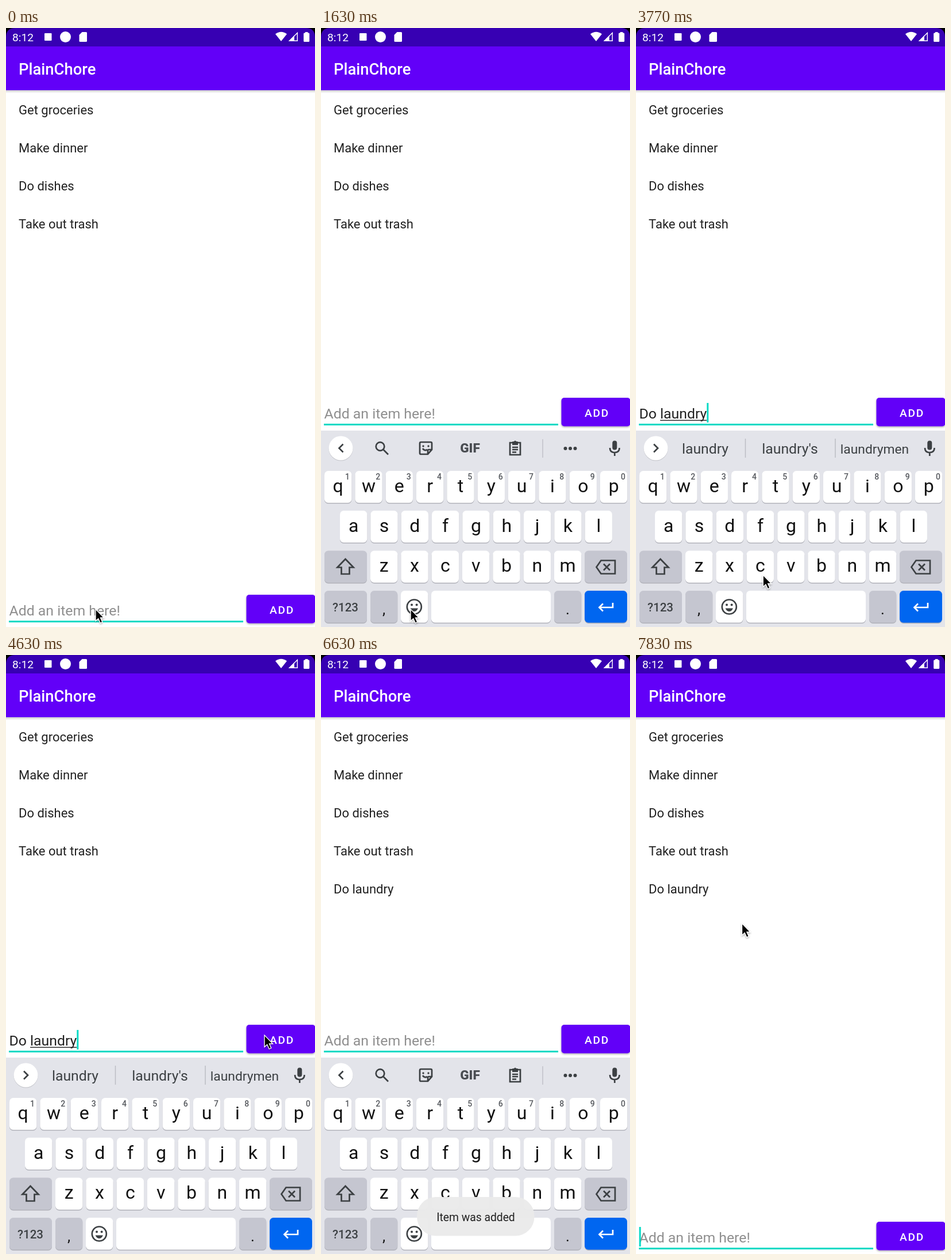
Animation, 538 px wide and 1040 px high, one loop 8000 ms. Source, as an HTML page:

```html
<!DOCTYPE html>
<html lang="en">
<head>
<meta charset="utf-8">
<title>PlainChore</title>
<style>
  html, body { margin: 0; width: 100%; height: 100%; overflow: hidden; background: #fff; }
  svg { display: block; width: 100%; height: 100%; }
  text { font-family: Roboto, "Noto Sans", sans-serif; white-space: pre; }
  .mid { text-anchor: middle; }
  .line { fill: none; stroke: #3c4043; stroke-width: 2.7; }
</style>
</head>
<body>
<svg viewBox="0 0 538 1040" xmlns="http://www.w3.org/2000/svg">
  <defs>
    <linearGradient id="shade" x2="0" y2="1">
      <stop stop-color="#000" stop-opacity=".2"/>
      <stop offset="1" stop-color="#000" stop-opacity="0"/>
    </linearGradient>
    <filter id="soft" x="-20%" y="-30%" width="140%" height="180%">
      <feDropShadow dx="0" dy="1.5" stdDeviation="1.5" flood-opacity=".35"/>
    </filter>
    <clipPath id="btnClip"><rect x="418.5" y="984" width="120" height="49.5" rx="5"/></clipPath>
  </defs>
  <rect width="538" height="1040" fill="#fff"/>

  <rect y="108" width="538" height="5" fill="url(#shade)"/>
  <rect y="31" width="538" height="77" fill="#6200f8"/>
  <rect width="538" height="32" fill="#000"/>
  <path d="M0 32V16Q0 0 16 0H522Q538 0 538 16V32Z" fill="#3700b3"/>
  <g fill="#fff">
    <text x="11" y="23" font-size="19.2">8:12</text>
    <rect x="67" y="9" width="12.5" height="13" rx="1"/>
    <circle cx="103.500" cy="15.500" r="9.500"/>
    <path d="M132.500 7H139.500Q141 7 141 8.500V22.500Q141 24 139.500 24H129Q127.500 24 127.500 22.500V12Z"/>
    <path d="M479 23L469 10.500Q479 3 489 10.500Z"/>
    <path d="M492 23L502 13V23Z"/>
    <path d="M493.500 22.300L507.300 8.500V22.300Z" fill="none" stroke="#fff" stroke-width="1.400"/>
    <path d="M521 8.500V7H525.500V8.500H527Q528.300 8.500 528.300 10V22.500Q528.300 24 527 24H519.500Q518.200 24 518.200 22.500V10Q518.200 8.500 519.500 8.500Z"/>
    <text x="22" y="81" font-size="27.4" font-weight="500">PlainChore</text>
  </g>
  <g id="list" font-size="22" fill="#212121"></g>

  <g id="field">
    <text id="typed" x="5.5" y="1020" font-size="24.8"></text>
    <rect id="under" y="1022.500" height="1.400" fill="#212121"/>
    <rect x="5" y="1029" width="408" height="3" fill="#03dac5"/>
    <rect id="caret" y="993" width="3" height="34" fill="#03dac5"/>
    <rect x="418.500" y="984" width="120" height="49.500" rx="5" fill="#6200f8" filter="url(#soft)"/>
    <g clip-path="url(#btnClip)"><circle id="ripple" cx="451" cy="1003" fill="#fff"/></g>
    <text x="459" y="1016.500" font-size="19.2" font-weight="500" letter-spacing="1.7" fill="#fff">ADD</text>
  </g>

  <g id="board">
    <rect y="699" width="538" height="430" fill="#e3e4ea"/>
    <circle cx="34.500" cy="730.500" r="21" fill="#bfc0c6"/>
    <circle cx="34.500" cy="729.500" r="21" fill="#fff"/>
    <path id="chevron" class="line"/>
    <g fill="#3c4043">
      <rect x="507.300" y="716.500" width="8" height="16" rx="4"/>
      <path class="line" stroke-width="2.500" d="M503 729Q503 737 511.300 737T519.600 729M511.300 737V743"/>
    </g>
    <g id="tools">
      <circle class="line" cx="103" cy="726.500" r="7.300"/>
      <path class="line" d="M108.500 732L117 740.500"/>
      <path class="line" d="M174 719H191Q193 719 193 721V732L186 740H174Q172 740 172 738V721Q172 719 174 719ZM193 732H187.500Q186 732 186 734V740M177 730Q180 735 185 732"/>
      <circle cx="178" cy="726" r="1.700" fill="#3c4043"/><circle cx="187" cy="726" r="1.700" fill="#3c4043"/>
      <text class="mid" x="259.500" y="737" font-size="22.500" font-weight="900" fill="#4a4d52">GIF</text>
      <path class="line" d="M329 720H347V741H329ZM333 728H343M333 732H343M333 736.500H340"/>
      <path d="M333 718H335.500Q338 715 340.500 718H343V724H333Z" fill="#3c4043"/>
      <path d="M386 714V746" stroke="#c0c1c8" stroke-width="1.500"/>
      <g fill="#3c4043"><circle cx="425.500" cy="730" r="3"/><circle cx="434" cy="730" r="3"/><circle cx="442.500" cy="730" r="3"/></g>
    </g>
    <g id="hints">
      <path d="M190.500 713V746M347 713V746" stroke="#bcbdc4" stroke-width="1.500"/>
    </g>
    <g id="keys"></g>
    <path class="line" d="M42.500 922L56.500 936.500H49.500V948H35.500V936.500H28.500Z"/>
    <path class="line" d="M487.500 924.500H512V947.500H487.500L479.500 936ZM492 930.500L503 941.500M503 930.500L492 941.500"/>
    <circle class="line" cx="162.300" cy="1005" r="12.500"/>
    <circle cx="158" cy="1001.500" r="2" fill="#3c4043"/><circle cx="166.600" cy="1001.500" r="2" fill="#3c4043"/>
    <path d="M155.500 1007.500H169Q166.500 1013 162.300 1013T155.500 1007.500Z" fill="#3c4043"/>
    <path d="M508 998V1006H485M491 999.500L484.500 1006L491 1012.500" fill="none" stroke="#fff" stroke-width="2.700"/>
  </g>

  <g id="toast">
    <rect x="167" y="941" width="204.500" height="67.500" rx="33" fill="#ebebeb" fill-opacity=".97"/>
    <text class="mid" x="269.500" y="983" font-size="19.300" fill="#212121">Item was added</text>
  </g>
  <path id="mouse" d="M0 0V20.500L4.700 16.300L8.200 24L11.800 22.400L8.400 15H14.500Z" fill="#000" stroke="#fff" stroke-width="1.300" filter="url(#soft)"/>
</svg>
<script>
const LOOP = 8000;
const $ = id => document.getElementById(id);

function add(parent, tag, attrs, text) {
  const el = document.createElementNS("http://www.w3.org/2000/svg", tag);
  for (const k in attrs) el.setAttribute(k, attrs[k]);
  if (text) el.textContent = text;
  parent.append(el);
  return el;
}

const items = ["Get groceries", "Make dinner", "Do dishes", "Take out trash", "Do laundry"]
  .map((s, i) => add($("list"), "text", { x: 22, y: 150 + 66 * i }, s));

// Keyboard
const PITCH = 53.33, KEY = 47.3, GREY = "#c5c6d0";
const keys = $("keys");
function key(x, y, w = KEY, fill = "#fff") {
  add(keys, "rect", { x, y: y + 1.5, width: w, height: 55.5, rx: 6.5, fill: "#b1b2ba" });
  add(keys, "rect", { x, y, width: w, height: 55.5, rx: 6.5, fill });
}
function label(x, y, s, size, fill = "#111", weight = 400) {
  add(keys, "text", { x, y, class: "mid", "font-size": size, fill, "font-weight": weight }, s);
}
[["qwertyuiop", 6, 769], ["asdfghjkl", 33, 838], ["zxcvbnm", 86, 907.5]].forEach(([row, left, y], r) =>
  [...row].forEach((c, i) => {
    const x = left + PITCH * i;
    key(x, y);
    label(x + KEY / 2, y + 36.5, c, 32);
    if (!r) label(x + 40, 783.5, String((i + 1) % 10), 14, "#55585d", 500);
  }));
[[6, 907.5, 74], [459, 907.5, 74], [6, 977, 74], [86, 977, KEY], [406, 977, KEY]]
  .forEach(([x, y, w]) => key(x, y, w, GREY));
key(139, 977);
key(192, 977, 208);
key(459, 977, 74, "#0066f0");
label(42.500, 1013, "?123", 20.500, "#3c4043", 500);
label(109.500, 1018, ",", 26);
label(429.500, 1018, ".", 26);

const words = [120.500, 268, 415.500].map(x =>
  add($("hints"), "text", { x, y: 739, class: "mid", fill: "#3c4043" }));

// time, text, start of the underlined word, suggestions
const typing = [
  [0, "", 0, ""],
  [1700, "D", 0, "D|Do|Did"],
  [1870, "Do", 0, "Do|So|Don't"],
  [2070, "Do ", 3, "Do|So|Don't"],
  [2520, "Do l", 3, "l|like|love"],
  [2660, "Do la", 3, "la|last|late"],
  [2810, "Do lau", 3, "lay|laugh|laundry"],
  [2950, "Do laun", 3, "laun|laundry|launch"],
  [3080, "Do laund", 3, "laund|laundry|launder"],
  [3220, "Do laundr", 3, "laundry|laundry's|laundrymen"],
  [3360, "Do laundry", 3, "laundry|laundry's|laundrymen"],
  [4880, "", 0, ""]
];
const caretOn = [[130, 630], [1130, 1630], [1700, 4880], [4930, 5600], [6100, 6630], [7090, LOOP]];
// start, end, from, to, bend
const moves = [
  [3500, 4430, [156, 1009], [450, 660], [7.500, 19]],
  [5640, 6230, [450, 660], [130, 1048], [0, 0]],
  [7470, 7800, [130, 1048], [184.500, 466], [0, 0]]
];

const ramp = (t, a, b) => Math.min(1, Math.max(0, (t - a) / (b - a)));
const ease = u => u * u * (3 - 2 * u);
const show = (el, on) => el.setAttribute("visibility", on ? "inherit" : "hidden");

function pointer(t) {
  const [a, b, from, to, bend] = moves.filter(m => t >= m[0]).pop() || moves[0];
  const s = ease(ramp(t, a, b));
  return from.map((v, i) => v + (to[i] - v) * s + 4 * s * (1 - s) * bend[i]);
}

let shown = null;
function setText(state) {
  if (state === shown) return;
  shown = state;
  const [, text, from, list] = state, el = $("typed");
  el.textContent = text || "Add an item here!";
  el.setAttribute("fill", text ? "#212121" : "#8f8f8f");
  const at = n => 5.500 + (n ? el.getSubStringLength(0, n) : 0);
  const end = at(text.length);
  $("caret").setAttribute("x", text ? end : 5.500);
  $("under").setAttribute("x", at(from));
  $("under").setAttribute("width", Math.max(0, end - at(from)));
  const parts = list.split("|");
  words.forEach((w, i) => {
    w.textContent = parts[i] || "";
    w.setAttribute("font-size", (parts[i] || "").length > 9 ? 22.800 : 24.800);
  });
}

function draw(t) {
  const state = typing.filter(s => t >= s[0]).pop();
  setText(state);
  show(items[4], t >= 4880);
  show($("caret"), caretOn.some(([a, b]) => t >= a && t < b));

  const raised = t >= 1020 && t < 7060;
  $("field").setAttribute("transform", `translate(0 ${raised ? -342 : 0})`);

  const rise = ramp(t, 970, 1230), fall = ramp(t, 7030, 7170);
  const shift = 119 * (1 - rise) ** 2 + 82 * fall;
  $("board").setAttribute("transform", `translate(0 ${shift})`);
  $("board").setAttribute("opacity", ramp(t, 970, 1060) * (1 - ramp(t, 7030, 7220)));

  const typed = state[1] !== "", closing = t >= 6960;
  show($("tools"), !typed && !closing);
  show($("hints"), typed);
  $("chevron").setAttribute("d", typed || closing
    ? "M31 722.500L38 729.500L31 736.500" : "M38.500 722.500L31.500 729.500L38.500 736.500");

  $("ripple").setAttribute("r", 15 + 85 * ramp(t, 4800, 5050));
  $("ripple").setAttribute("opacity", .24 * ramp(t, 4800, 4860) * (1 - ramp(t, 5000, 5270)));
  $("toast").setAttribute("opacity", ramp(t, 4930, 5230) * (1 - ramp(t, 6930, 7270)));
  $("mouse").setAttribute("transform", `translate(${pointer(t)})`);
}

function tick() {
  draw(performance.now() % LOOP);
  requestAnimationFrame(tick);
}
tick();
</script>
</body>
</html>
```
